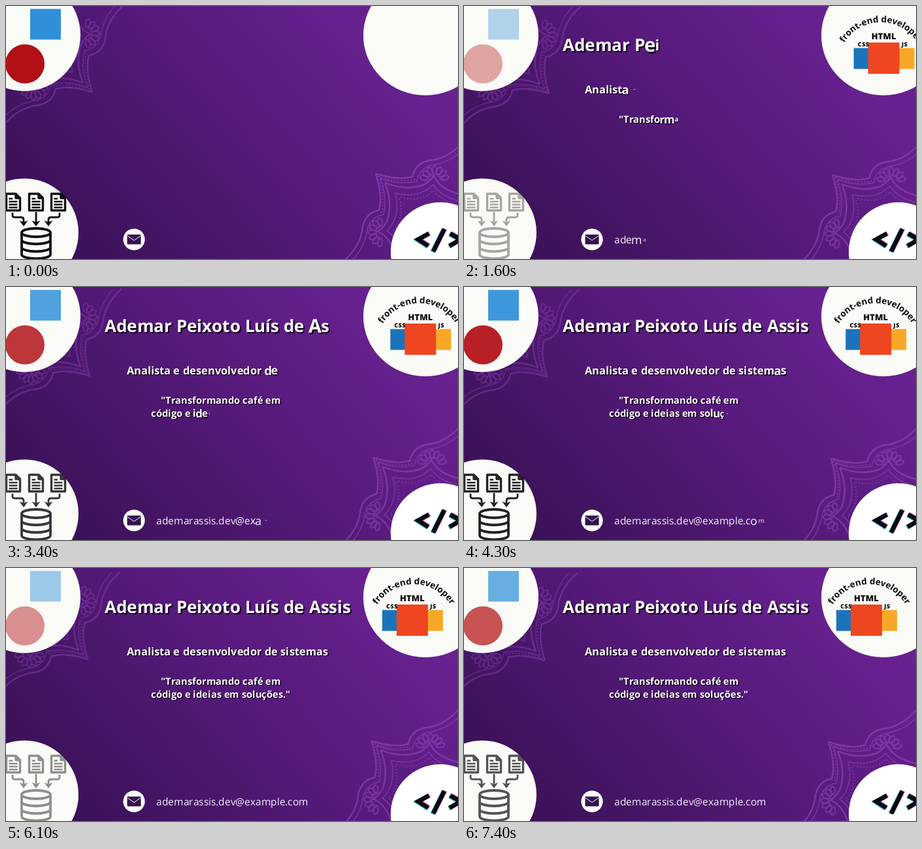
Animation, 692 px wide and 388 px high, one loop 7.5 s. Source, as an HTML page:

```html
<!DOCTYPE html>
<html lang="pt-BR">
<head>
<meta charset="utf-8">
<title>Cartão de apresentação</title>
<style>
  html, body { margin: 0; width: 100%; height: 100%; overflow: hidden; }
  body {
    position: relative;
    background: linear-gradient(48deg, #34104e 0%, #421461 22%, #561a7b 52%, #64208c 78%, #6d2597 100%);
    font-family: "Open Sans", "Noto Sans", sans-serif;
    text-rendering: geometricPrecision;
  }
  svg { position: absolute; left: 0; top: 0; display: block; }
  svg text { font-family: "Open Sans", "Noto Sans", sans-serif; fill: #0c0c0c; text-anchor: middle; }
  #lace { animation: pan 7.5s linear infinite; }
  @keyframes pan { to { transform: translate(-8px, 10px); } }
  .line { position: absolute; white-space: pre; color: #fbf9fc; font-weight: 700; }
  .line span { display: inline-block; transform: scale(0); }
  #name { left: 151px; top: 41px; font-size: 26px; line-height: 36px; text-shadow: 2px 2px 1px rgba(0,0,0,.85); }
  #role { left: 184.5px; top: 115.6px; font-size: 16.5px; line-height: 24px; }
  .motto { font-size: 14.75px; line-height: 20.5px; }
  #motto1 { left: 237.2px; top: 163.9px; }
  #motto2 { left: 222px; top: 184.4px; }
  #role, .motto { text-shadow: 1.4px 1.4px 1px rgba(0,0,0,.85); }
  #mail { left: 230.3px; top: 346.8px; font-size: 15.5px; line-height: 22px; font-weight: 400; color: #f3edf7; }
</style>
</head>
<body>
<svg width="692" height="388" viewBox="0 0 692 388">
  <defs>
    <g id="half">
      <path d="M566 257Q600 268 622 262Q627 238 655 236Q680 231 700 208" stroke-width="2.4"/>
      <path d="M573 264Q602 275 629 269Q633 246 658 243Q682 238 700 220" stroke-width="1.4"/>
      <path d="M570 261Q601 272 626 266" stroke-width="2" stroke-dasharray="2 3"/>
      <path d="M580 271Q612 284 640 274Q650 268 655 260Q664 282 700 290" stroke-width="2.4"/>
      <path d="M596 287Q632 296 654 274Q666 293 700 301" stroke-width="1.5"/>
      <path d="M604 293Q636 302 654 283Q668 300 700 308" stroke-width="2" stroke-dasharray="2 3"/>
      <g class="fan"></g>
    </g>
    <g id="corner" fill="none" stroke="#9a4cc0">
      <use href="#half"/>
      <use href="#half" transform="matrix(0 1 1 0 309 -309)"/>
    </g>
    <g id="doc" fill="none" stroke="#111" stroke-width="3.4" stroke-linejoin="round">
      <path d="M-10.5 2H4L10.5 8.5V27.5H-10.5ZM4 2V8.5H10.5"/>
      <path d="M-6.5 9.5H-1M-6.5 14H6.5M-6.5 18.5H6.5M-6.5 23H6.5" stroke-width="2.4"/>
    </g>
    <g id="flow">
      <path d="M10 317V321Q10 324 13 324H23Q27 324 27 328V333" fill="none" stroke="#111" stroke-width="2.8"/>
      <path d="M20.5 329L27 331.5L33.5 329L27 338Z" fill="#111"/>
    </g>
    <path id="code" d="M647.5 349L631 358L646.5 368M671 342L654 376.5M680 349L696 358L679 368" fill="none" stroke-width="6.8"/>
    <path id="arc" d="M554.8 90.5A65.7 65.7 0 0 1 686.2 90.5"/>
  </defs>

  <g id="lace">
    <use href="#corner" opacity=".58"/>
    <use href="#corner" opacity=".42" transform="rotate(180 349 194.5)"/>
  </g>

  <g fill="#fafaf6">
    <circle cx="28" cy="44.5" r="86"/>
    <circle cx="28" cy="347.5" r="83"/>
    <ellipse cx="642" cy="45" rx="95" ry="92"/>
    <circle cx="665" cy="377" r="76" fill="#fff"/>
  </g>

  <g id="tools">
    <rect x="37" y="4.5" width="47" height="47" fill="#2f8fd8"/>
    <circle cx="29" cy="88.7" r="30" fill="#b21014"/>
    <use href="#doc" x="11" y="286"/>
    <use href="#doc" x="46" y="286"/>
    <use href="#doc" x="80" y="286"/>
    <use href="#flow"/>
    <use href="#flow" transform="matrix(-1 0 0 1 92 0)"/>
    <path d="M46 316V333" stroke="#111" stroke-width="2.8"/>
    <path d="M39.5 329L46 331.5L52.5 329L46 338Z" fill="#111"/>
    <g fill="none" stroke="#111" stroke-width="3.8">
      <ellipse cx="46" cy="347.5" rx="22" ry="6.5"/>
      <path d="M24 347V381A22 6.5 0 0 0 68 381V347M24 358.5A22 6.5 0 0 0 68 358.5M24 370A22 6.5 0 0 0 68 370"/>
    </g>
  </g>

  <g id="arcText">
    <text font-size="13.5" font-weight="700"><textPath href="#arc" startOffset="50%">front-end developer</textPath></text>
  </g>
  <g id="badges" font-weight="800">
    <rect x="570" y="64.5" width="32" height="32" fill="#1b74bb"/>
    <rect x="631" y="64.5" width="32" height="32" fill="#f8a828"/>
    <rect x="592" y="56" width="48" height="48" fill="#ee4620"/>
    <text x="616" y="50.5" font-size="13">HTML</text>
    <text x="585" y="61.5" font-size="9" letter-spacing=".5">CSS</text>
    <text x="648" y="61.5" font-size="9" letter-spacing=".5">JS</text>
  </g>

  <use href="#code" stroke="#45c4d8" x="-1.2" y=".8"/>
  <use href="#code" stroke="#d77bc4" x="1.2" y="-.6"/>
  <use href="#code" stroke="#0a0a12"/>

  <circle cx="196" cy="358" r="16.6" fill="#fff"/>
  <rect x="185.5" y="350.5" width="21" height="15" rx="1" fill="#33124e"/>
  <path d="M186 352.5L196 359.5L206 352.5" fill="none" stroke="#fff"/>
</svg>

<div class="line" id="name"></div>
<div class="line" id="role"></div>
<div class="line motto" id="motto1"></div>
<div class="line motto" id="motto2"></div>
<div class="line" id="mail"></div>

<script>
const LOOP = 7500, STEP = 100, BLINK = 1090;
const $ = id => document.getElementById(id);

// Petals around the dome of the corner ornament
const petals = [];
for (let a = -75; a <= 75; a += 25)
  petals.push(`<path d="M0 -9Q-7 -19 0 -23Q7 -19 0 -9" transform="translate(656 268) rotate(${a})" stroke-width="1.7"/>`);
document.querySelector('.fan').innerHTML = petals.join('');

// Each letter pops in at start + index * gap (ms)
const letters = [];
function typeLine(id, text, start, gap) {
  [...text].forEach((ch, i) => {
    const span = document.createElement('span');
    span.textContent = ch;
    $(id).append(span);
    letters.push({ span, at: start + i * gap });
  });
}
const first = '"Transformando café em', mottoGap = 76.4;
typeLine('name', 'Ademar Peixoto Luís de Assis', 410, 119);
typeLine('role', 'Analista e desenvolvedor de sistemas', 650, 100);
typeLine('motto1', first, 738, mottoGap);
typeLine('motto2', 'código e ideias em soluções."', 738 + first.length * mottoGap, mottoGap);
typeLine('mail', 'ademarassis.dev@example.com', 1030, 122);

const ease = p => (1 - Math.cos(Math.PI * p)) / 2;

// Grow past full size, then settle
function pop(age) {
  if (age <= 0) return 0;
  if (age < 180) return 1.15 * ease(age / 180);
  return age < 400 ? 1.15 - 0.15 * ease((age - 180) / 220) : 1;
}

function drift(id, t, speed) {
  const p = Math.min(t / 700, 1);
  const x = speed * (7400 - t) / 1000 + 40 * (1 - p) ** 3;
  $(id).setAttribute('transform', `translate(${x.toFixed(2)} 0)`);
  $(id).setAttribute('opacity', p);
}

function draw(t) {
  const phase = t / BLINK % 1;
  $('tools').setAttribute('opacity', 1 - 1.35 * Math.min(phase, 1 - phase));
  drift('arcText', t, 3.05);
  drift('badges', t, 4.6);
  for (const { span, at } of letters) span.style.transform = `scale(${pop(t - at).toFixed(3)})`;
}

const begin = performance.now();
function tick() {
  const t = (performance.now() - begin) % LOOP;
  draw(Math.floor(t / STEP) * STEP);
  requestAnimationFrame(tick);
}
tick();
</script>
</body>
</html>
```
